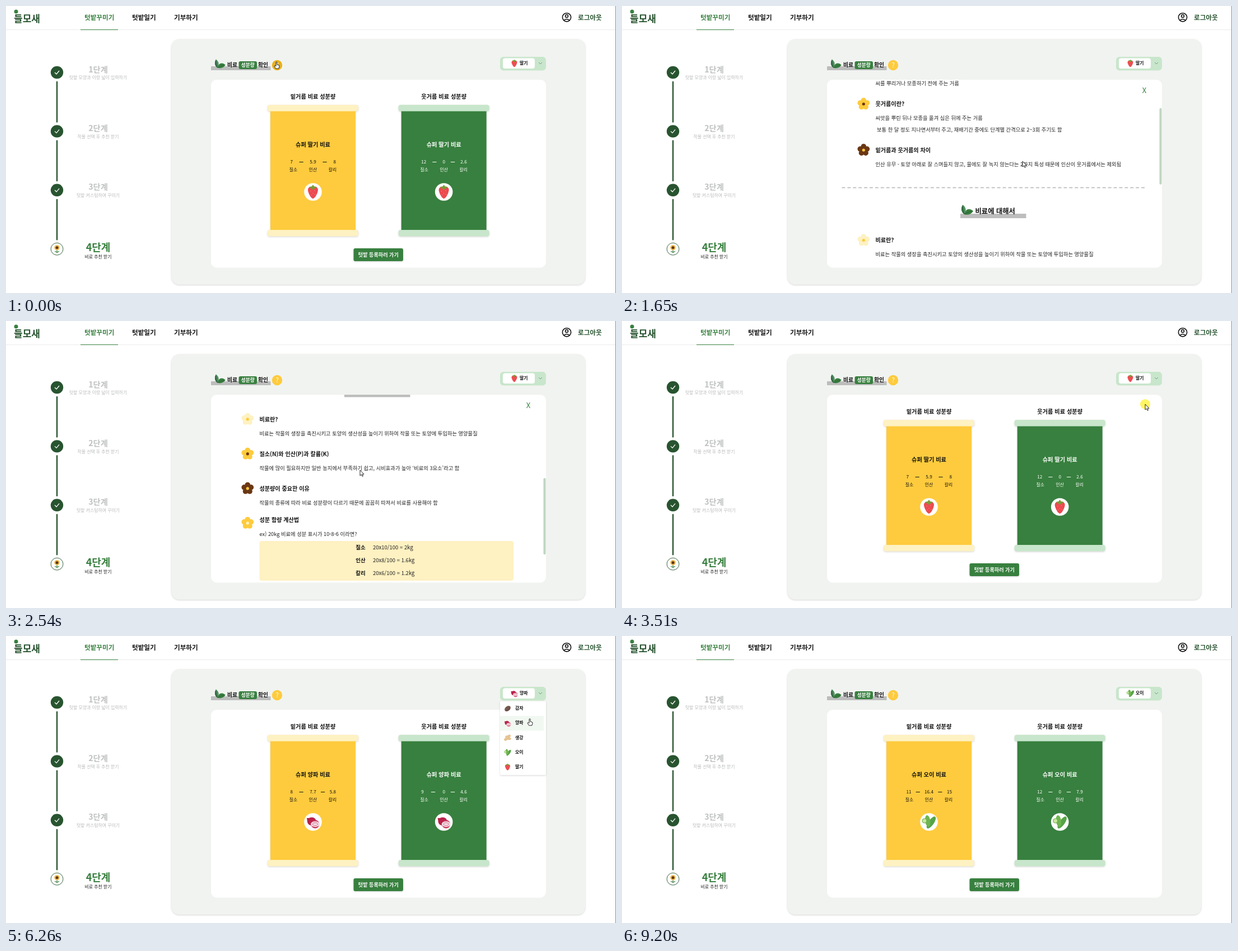
Animation, 1089 px wide and 514 px high, one loop 9330 ms. Source, as an HTML page:

```html
<!DOCTYPE html>
<html lang="ko">
<head>
<meta charset="utf-8">
<title>비료 성분량 확인</title>
<style>
  html, body { margin: 0; width: 100%; height: 100%; overflow: hidden; background: #fff; }
  svg { display: block; }
  text { font-family: "Noto Sans CJK KR", "Noto Sans CJK", "Noto Sans", sans-serif; white-space: pre; }
  .shadow { filter: drop-shadow(0 1px 1.5px rgba(0, 0, 0, .16)); }
</style>
</head>
<body>
<svg id="stage" width="1089" height="514" viewBox="0 0 1089 514">
  <defs>
    <clipPath id="cardClip"><rect x="366" y="132" width="598" height="336.5" rx="8"/></clipPath>
    <g id="leaf">
      <path d="M7 18C9 8 17 5 24 12C20 19 12 20 7 18Z" fill="#38803f"/>
      <path d="M7 18C0 13 1 5 4 0C11 5 11 12 7 18Z" fill="#4f8f62"/>
      <path d="M4 0C3 6 4 12 7 18C0 13 1 5 4 0Z" fill="#2f6b40"/>
      <path d="M4 3Q5 11 7 18Q14 13 22 12.5" fill="none" stroke="#285430" stroke-width=".9"/>
    </g>
    <g id="crop0">
      <ellipse rx="12" ry="8.3" transform="rotate(-38)" fill="#765950"/>
      <path d="M-5 7Q5 8 8-3" fill="none" stroke="#5d433c" stroke-width="2"/>
      <path d="M-4-2h1M2-5h1M0 2h1M5-2h1" stroke="#4b342e" stroke-width="1.2"/>
    </g>
    <g id="crop1">
      <path d="M-11-7L-7-7C2-11 8-4 5 3C1 9-9 7-10 0Z" fill="#b8234a"/>
      <circle cx="4" cy="4" r="7.5" fill="#c93b5d"/>
      <path d="M-4 4A8 5 0 0 1 12 4A8 5 0 0 1-4 4Z" fill="#f6dbe2"/>
      <ellipse cx="4" cy="4" rx="4.5" ry="2.5" fill="none" stroke="#d0708a"/>
    </g>
    <g id="crop2" fill="#ebc899" stroke="#d3a873" stroke-width=".8">
      <ellipse cx="-6" cy="5" rx="6.5" ry="4.5" transform="rotate(-25 -6 5)"/>
      <ellipse cx="5" cy="-6" rx="6" ry="4.5" transform="rotate(-35 5 -6)"/>
      <ellipse cx="6" cy="3" rx="6" ry="4"/>
      <ellipse cx="-2" cy="-3" rx="6" ry="5"/>
      <path d="M-5-4q3 2 6-1M3 3q3 2 6 0M-8 6q3 0 5-2" fill="none"/>
    </g>
    <g id="crop3">
      <ellipse cx="4" cy="1" rx="4.8" ry="12.5" transform="rotate(35 4 1)" fill="#56a447"/>
      <ellipse cx="-2" cy="-2" rx="4.6" ry="10.5" transform="rotate(-8)" fill="#6fb551"/>
      <circle cx="-8" cy="-2" r="4" fill="#c9e7a0" stroke="#68ab48"/>
    </g>
    <g id="crop4">
      <path d="M0-8C7-11 11-6 8 1C6 7 3 11 0 12C-3 11-6 7-8 1C-11-6-7-11 0-8Z" fill="#ec4b50"/>
      <path d="M-4-2v1M3-3v1M0 2v1M-3 5v1M4 4v1" stroke="#f6a39a"/>
      <path d="M-7-9L-2-10 0-13 2-10 7-9 3-6 0-4-3-6Z" fill="#7a9a35"/>
    </g>
    <path id="arrow" d="M0 0V10L2.4 8 4 11.3 5.6 10.6 4.1 7.3H7Z" fill="#fff" stroke="#111" stroke-width=".9"/>
    <path id="hand" d="M-1 1A1 1 0 0 1 1 1V5L4 6Q5.5 6.5 5 8L4 12H-1.5L-4 8Q-4 6.5-2.5 7L-1 8Z" fill="#fff" stroke="#111" stroke-width=".9"/>
  </defs>
</svg>
<script>
const GREEN = '#38803f', DARK = '#285430', MINT = '#c8e6cb', YELLOW = '#fecb3e', CREAM = '#fef1c2', BROWN = '#6b3714';
const LOOP = 9330;

const CROPS = [
  ['감자', ['13', '3.3', '11'], ['0', '0', '0']],
  ['양파', ['8', '7.7', '5.8'], ['9', '0', '4.6']],
  ['생강', ['3', '3.5', '2'], ['13', '0', '8.2']],
  ['오이', ['11', '16.4', '15'], ['12', '0', '7.9']],
  ['딸기', ['7', '5.9', '8'], ['12', '0', '2.6']]
];

// y is the middle of the line
const text = (x, y, s, size, fill = '#111', weight = 700, anchor = 'start') =>
  `<text x="${x}" y="${y + size * .365}" font-size="${size}" font-weight="${weight}" fill="${fill}" text-anchor="${anchor}">${s}</text>`;
const mid = (x, y, s, size, fill, weight) => text(x, y, s, size, fill, weight, 'middle');
const rect = (x, y, w, h, r, fill, extra = '') =>
  `<rect x="${x}" y="${y}" width="${w}" height="${h}" rx="${r}" fill="${fill}" ${extra}/>`;
const circle = (x, y, r, fill, extra = '') => `<circle cx="${x}" cy="${y}" r="${r}" fill="${fill}" ${extra}/>`;
const line = (d, stroke, width, extra = '') =>
  `<path d="${d}" fill="none" stroke="${stroke}" stroke-width="${width}" ${extra}/>`;
const use = (id, x, y, scale = 1) => `<use href="#${id}" transform="translate(${x} ${y}) scale(${scale})"/>`;

function flower(x, y, petal, heart, n = 5, size = 1) {
  let out = '';
  for (let i = 0; i < n; i++) {
    const a = i / n * 2 * Math.PI - Math.PI / 2;
    out += circle(6.4 * Math.cos(a), 6.4 * Math.sin(a), 4.8, petal);
  }
  return `<g transform="translate(${x} ${y}) scale(${size})">${out}${circle(0, 0, 4.5, petal)}${circle(0, 0, 2.6, heart)}</g>`;
}

function header() {
  return circle(18, 10, 3.5, GREEN) + text(14, 23, '들모새', 17, DARK, 900) +
    text(140, 21, '텃밭꾸미기', 11.6, GREEN) + text(225, 21, '텃밭일기', 11.6) + text(300, 21, '기부하기', 11.6) +
    line('M0 42.5H1089', '#ebebeb', 1) + line('M133 42.5H200', GREEN, 1.2) +
    circle(1001, 20.3, 7.6, 'none', 'stroke="#111" stroke-width="1.6"') +
    circle(1001, 18, 2.5, 'none', 'stroke="#111" stroke-width="1.5"') +
    line('M996 25.5Q1001 21.5 1006 25.5', '#111', 1.5) + text(1021, 21, '로그아웃', 11.6, DARK);
}

function steps() {
  const notes = ['텃밭 모양과 이랑 넓이 입력하기', '작물 선택 후 추천 받기', '텃밭 커스텀하여 꾸미기', '비료 추천 받기'];
  return notes.map((note, i) => {
    const y = 119 + 105.4 * i, last = i === 3;
    const badge = last
      ? circle(91, y, 10.9, '#fff', `stroke="${DARK}" stroke-width=".9"`) +
        line(`M91 ${y}V${y + 7}M91 ${y + 6}l-4 -2M91 ${y + 6}l4 -2`, GREEN, 1.2) +
        flower(91, y - 2.5, '#f0bd55', '#5b3216', 9, .44) + circle(91, y - 2.5, 2.5, '#5b3216')
      : circle(91, y, 11.2, DARK) + line(`M87 ${y}l3 3 5 -6`, '#fff', 1.3) +
        line(`M91 ${y + 16}V${y + 89.5}`, DARK, 2.4);
    return badge + mid(164.5, y - (last ? 3 : 5.5), `${i + 1}단계`, last ? 18 : 14.2, last ? GREEN : '#bfc1c0') +
      mid(164.5, y + (last ? 13.5 : 9.3), note, 7.9, last ? '#222' : '#b9bbba', 400);
  }).join('');
}

function panel() {
  return rect(295.5, 59.5, 738.5, 439.5, 14, '#f1f3f0', 'class="shadow"') +
    rect(366, 108, 106.5, 7, 0, '#bdbdbd') + use('leaf', 371.5, 95.5, .84) +
    text(395, 105.5, '비료', 9.8) + rect(415.5, 99, 32.5, 14, 3, GREEN) + mid(431.8, 105.8, '성분량', 8.7, '#fff') +
    text(450, 105.5, '확인', 9.8) + circle(484, 106, 9.2, YELLOW, 'id="help"') + mid(484, 106, '?', 11, '#fff', 400) +
    rect(366, 132, 598, 336.5, 10, '#fff') +
    rect(882, 91, 82, 24.5, 6, MINT) + rect(887, 93.5, 57, 18.5, 4, '#fff') +
    line('M951 101l3 3 3 -3', '#7f9a83', 1);
}

function bag(x, title, body, bar) {
  return mid(x, 162, title, 10.2) +
    `<g class="shadow">${rect(x - 76, 183, 152, 224, 0, body)}${rect(x - 81, 177, 162, 11.5, 4, bar)}${rect(x - 81, 401, 162, 11.5, 4, bar)}</g>` +
    circle(x, 333, 15.8, '#fff');
}

const numberWidth = s => s.length * 4.6 - (s.includes('.') ? 2.3 : 0);

function bagLabel(x, i, name, [a, b, c], ink) {
  const left = x - 40.5, right = x + 41, half = numberWidth(b) / 2;
  const dash = at => line(`M${at - 3.6} 279.5h7.2`, ink, 1);
  return mid(x, 248, `슈퍼 ${name} 비료`, 10.2, ink) +
    text(left, 279.5, a, 8.2, ink, 500) + mid(x, 279.5, b, 8.2, ink, 500) + text(right, 279.5, c, 8.2, ink, 500, 'end') +
    dash((left + numberWidth(a) + x - half) / 2) + dash((right - numberWidth(c) + x + half) / 2) +
    ['질소', '인산', '칼리'].map((s, k) => mid(x + 35 * (k - 1), 293, s, 7.8, ink, 400)).join('') +
    use('crop' + i, x, 333);
}

function guide() {
  const title = (y, s) => rect(604, y + 4, 117.5, 8, 0, '#bdbdbd') + use('leaf', 604.5, y - 12, .94) + text(630.5, y, s, 12.3);
  const para = (y, s) => text(452.5, y, s, 9.27, '#222', 400);
  const entry = (y, petal, heart, head, body, drop = 0) =>
    flower(431.3, y + drop, petal, heart) + text(452.5, y, head, 10.1) + para(y + 25.5, body);
  const rows = [['질소', '20x10/100 = 2kg'], ['인산', '20x8/100 = 1.6kg'], ['칼리', '20x6/100 = 1.2kg']];
  return title(188, '거름에 대해서') +
    entry(239.5, CREAM, YELLOW, '밑거름이란?', '씨를 뿌리거나 모종하기 전에 주는 거름') +
    entry(301.5, YELLOW, BROWN, '웃거름이란?', '씨앗을 뿌린 뒤나 모종을 옮겨 심은 뒤에 주는 거름') +
    para(347.5, ' 보통 한 달 정도 지나면서부터 주고, 재배기간 중에도 단계별 간격으로 2~3회 주기도 함') +
    entry(384, BROWN, YELLOW, '밑거름과 웃거름의 차이', '인산 유무 - 토양 아래로 잘 스며들지 않고, 물에도 잘 녹지 않는다는 2가지 특성 때문에 인산이 웃거름에서는 제외됨') +
    line('M392.5 451.3H933', '#bdbdbd', 1.8, 'stroke-dasharray="5.9 4"') +
    title(494, '비료에 대해서') +
    entry(545.5, CREAM, YELLOW, '비료란?', '비료는 작물의 생장을 촉진시키고 토양의 생산성을 높이기 위하여 작물 또는 토양에 투입하는 영양물질') +
    entry(607.5, YELLOW, BROWN, '질소(N)와 인산(P)과 칼륨(K)', '작물에 많이 필요하지만 일반 농지에서 부족하기 쉽고, 시비효과가 높아 ‘비료의 3요소’라고 함') +
    entry(669.5, BROWN, YELLOW, '성분량이 중요한 이유', '작물의 종류에 따라 비료 성분량이 다르기 때문에 꼼꼼히 따져서 비료를 사용해야 함') +
    entry(726, YELLOW, CREAM, '성분 함량 계산법', 'ex) 20kg 비료에 성분 표시가 10-8-6 이라면?', 5.5) +
    rect(452.5, 763.5, 453.5, 71, 4, CREAM) +
    rows.map(([k, v], i) => mid(633, 775.5 + 23 * i, k, 9.5) + text(655, 775.5 + 23 * i, v, 9.5, '#222', 400)).join('');
}

const $ = id => document.getElementById(id);
$('stage').insertAdjacentHTML('beforeend',
  header() + steps() + panel() +
  `<g id="bags">${bag(548, '밑거름 비료 성분량', YELLOW, CREAM)}${bag(781.7, '웃거름 비료 성분량', GREEN, MINT)}
    ${rect(620.5, 434, 88.5, 23, 3, GREEN, 'class="shadow"')}${mid(664.8, 445.5, '텃밭 등록하러 가기', 9.1, '#fff')}
    ${CROPS.map(([name, base, top], i) => `<g id="label${i}">${bagLabel(548, i, name, base, '#111')}${bagLabel(781.7, i, name, top, '#fff')}</g>`).join('')}</g>` +
  CROPS.map(([name], i) => `<g id="choice${i}">${use('crop' + i, 907.5, 102.8, .55)}${text(917, 102, name, 7.9)}</g>`).join('') +
  `<g id="modal" clip-path="url(#cardClip)"><g id="guide">${guide()}</g>
    ${mid(932.5, 151.5, 'X', 13, GREEN, 500)}${rect(959.5, 132, 4, 137, 2, '#bfd6c2', 'id="thumb"')}</g>` +
  `<g id="list">${rect(882, 117, 82, 132, 2, '#fff', 'class="shadow"')}${rect(882, 117, 78, 26.2, 0, '#f1f8f1', 'id="hover"')}
    ${CROPS.map(([name], i) => use('crop' + i, 895.5, 130 + 26.2 * i, .5) + text(909, 129.3 + 26.2 * i, name, 7.9)).join('')}</g>` +
  circle(0, 0, 9, '#fff23c', 'id="press" opacity=".8"') +
  `<use id="pointer"/>` + rect(1088, 0, 1, 514, 0, '#8c8c8c'));

const CURSOR = [
  [0, 483, 100], [600, 483, 100], [1100, 690, 215], [1650, 715, 278], [1720, 715, 278], [2000, 631, 267], [2060, 632, 267],
  [2900, 632, 267], [3400, 934, 149], [3640, 934, 149], [3930, 934, 100], [4080, 934, 100], [4420, 933, 132], [4620, 933, 132],
  [4880, 934, 100], [5000, 934, 100], [5140, 934, 132], [5400, 935, 157], [5580, 935, 157], [5900, 935, 100], [6060, 935, 100],
  [6420, 935, 182], [6640, 935, 182], [6960, 935, 100], [7120, 935, 100], [7430, 936, 178], [7520, 936, 178], [7780, 935, 206],
  [8200, 935, 206], [8900, 1085, 522]
];
const SCROLL = [[1400, 0], [1650, 126], [1700, 126], [1960, 239], [2180, 239], [2250, 339.5], [2400, 339.5], [2900, 495]];
const OPEN = 430, CLOSE = 3500;
const MENUS = [[4020, 4560], [4960, 5520], [6020, 6580], [7080, 7980]];
const CLICKS = [OPEN, CLOSE, ...MENUS.flat()];

function along(keys, t) {
  const n = keys.findIndex(k => k[0] > t);
  if (n < 0) return keys[keys.length - 1].slice(1);
  if (!n) return keys[0].slice(1);
  const [a, b] = [keys[n - 1], keys[n]], u = (t - a[0]) / (b[0] - a[0]), e = u * u * (3 - 2 * u);
  return a.slice(1).map((v, i) => v + (b[i + 1] - v) * e);
}
const show = (id, on) => $(id).style.display = on ? '' : 'none';
const move = (id, x, y) => $(id).setAttribute('transform', `translate(${x} ${y})`);

function draw(t) {
  const [x, y] = along(CURSOR, t), [scroll] = along(SCROLL, t);
  const modal = t >= OPEN && t < CLOSE;
  const menu = MENUS.some(([a, b]) => t >= a && t < b);
  const picked = MENUS.filter(m => t >= m[1]).length;
  const crop = picked ? picked - 1 : 4;

  show('modal', modal);
  show('bags', !modal);
  move('guide', 0, -scroll);
  move('thumb', 0, scroll * .4035);
  CROPS.forEach((_, i) => { show('label' + i, i === crop); show('choice' + i, i === crop); });

  const row = Math.floor((y - 117) / 26.2);
  show('list', menu);
  show('hover', row >= 0 && row < 5);
  move('hover', 0, Math.max(row, 0) * 26.2);

  const onHelp = Math.hypot(x - 484, y - 106) < 9.2;
  const onMenu = x > 882 && x < 964 && (y < 116 || menu);
  const onCross = modal && Math.hypot(x - 932.5, y - 151.5) < 8;
  $('help').setAttribute('fill', onHelp ? '#e9b01c' : YELLOW);
  $('pointer').setAttribute('href', onHelp || onMenu || onCross ? '#hand' : '#arrow');
  show('pointer', t < 8900);
  move('pointer', x, y);
  show('press', CLICKS.some(c => t >= c - 70 && t < c + 70));
  move('press', x, y);
}

(function frame() {
  draw(performance.now() % LOOP);
  requestAnimationFrame(frame);
})();
</script>
</body>
</html>
```
